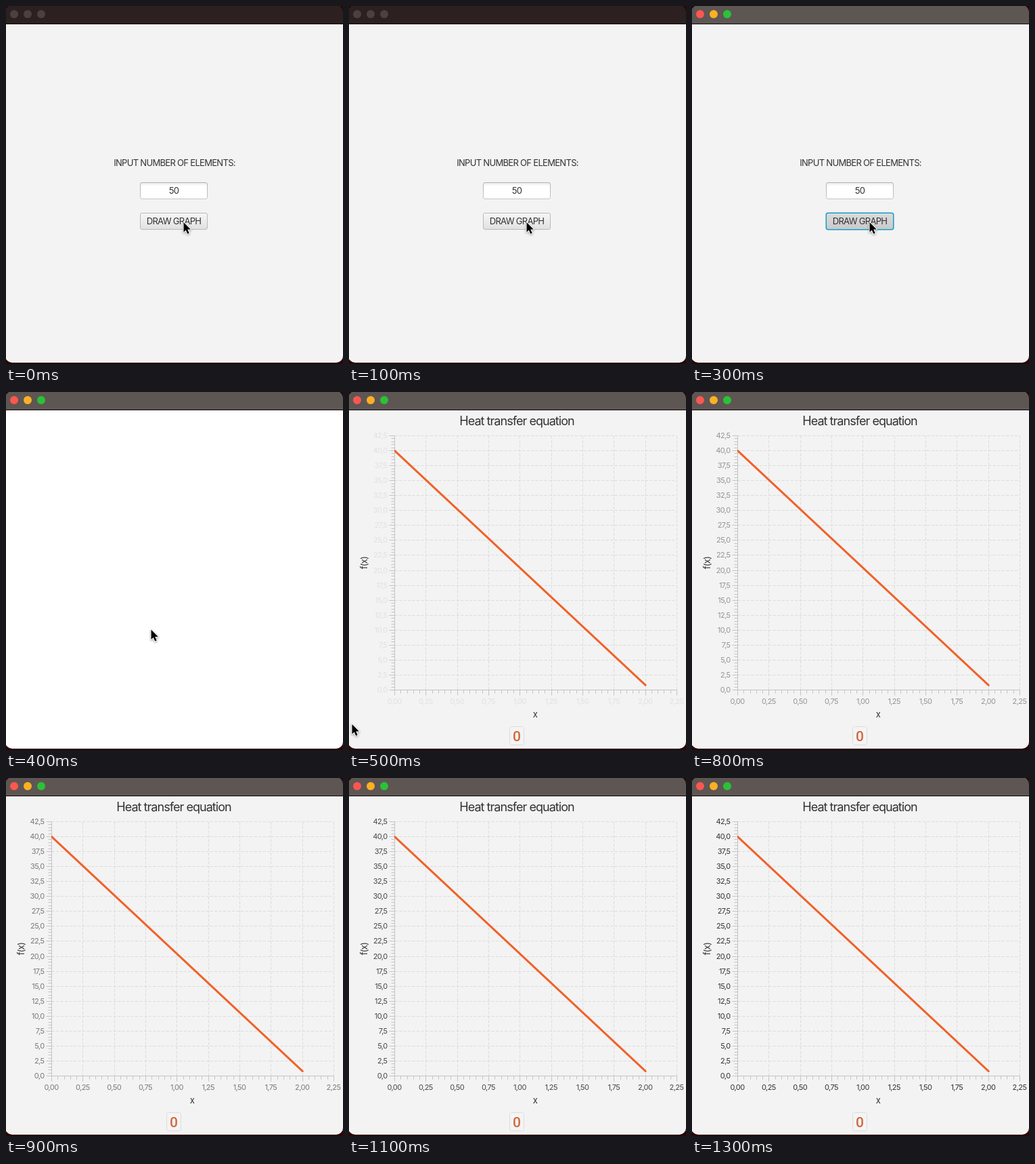
An HTML page with a canvas for the animation above (1.5 s loop, 498 px wide and 528 px high).

```html
<!DOCTYPE html>
<html lang="en">
<head>
<meta charset="utf-8">
<title>Heat transfer equation</title>
<style>
  html, body { margin: 0; width: 100%; height: 100%; overflow: hidden; background: #2a0608; }
  canvas { display: block; }
</style>
</head>
<body>
<canvas id="stage" width="498" height="528"></canvas>
<script>
const ctx = document.getElementById('stage').getContext('2d');
const LOOP = 1500;
const INK = '#323232';
const plot = { left: 67.5, right: 484.5, top: 64.5, bottom: 439.5 };
const toX = v => plot.left + v / 2.25 * (plot.right - plot.left);
const toY = v => plot.bottom - v / 42.5 * (plot.bottom - plot.top);

function text(str, x, y, size = 13, align = 'center', color = INK) {
  ctx.font = `${size}px Inter, sans-serif`;
  ctx.letterSpacing = `${-0.053 * size}px`;
  ctx.textAlign = align;
  ctx.fillStyle = color;
  ctx.fillText(str, x, y);
}

function line(x1, y1, x2, y2) {
  ctx.beginPath();
  ctx.moveTo(x1, y1);
  ctx.lineTo(x2, y2);
  ctx.stroke();
}

function box(x, y, w, h, radius, fill, border, width = 1) {
  ctx.beginPath();
  ctx.roundRect(x, y, w, h, radius);
  ctx.fillStyle = fill;
  ctx.fill();
  ctx.strokeStyle = border;
  ctx.lineWidth = width;
  ctx.stroke();
}

function shade(y1, y2, ...colors) {
  const gradient = ctx.createLinearGradient(0, y1, 0, y2);
  colors.forEach((c, i) => gradient.addColorStop(i / (colors.length - 1), c));
  return gradient;
}

function drawWindow(active, background) {
  ctx.fillStyle = background;
  ctx.fillRect(0, 26, 498, 502);
  ctx.fillStyle = active ? '#5e5653' : '#2c2120';
  ctx.fillRect(0, 0, 498, 26);
  ctx.fillStyle = '#0c0808';
  ctx.fillRect(0, 26, 498, 1);
  const lights = active ? ['#fe5650', '#fdb024', '#2bc138'] : Array(3).fill('#4a4140');
  lights.forEach((color, i) => {
    ctx.beginPath();
    ctx.arc(12 + 20 * i, 12, 6, 0, 2 * Math.PI);
    ctx.fillStyle = color;
    ctx.fill();
  });
}

function drawForm(pressed) {
  text('INPUT NUMBER OF ELEMENTS:', 249, 236);
  box(198.5, 260.5, 99, 24, 2.5, shade(261, 266, '#ececec', '#fff'), shade(260, 285, '#b0b0b0', '#c6c6c6'));
  text('50', 248, 277);
  if (pressed) box(198.25, 305.25, 99.5, 24.5, 3, shade(305, 330, '#dcdcdc', '#c9c9c9'), '#139fc6', 1.5);
  else box(198.5, 305.5, 99, 24, 2.5, shade(305, 330, '#f7f7f7', '#e0e0e0'), '#b9b9b9');
  text('DRAW GRAPH', 248, 322);
}

function drawGrid() {
  ctx.lineWidth = 1;
  ctx.strokeStyle = '#dcdcdc';
  ctx.setLineDash([4.25, 2.25]);
  const snap = v => Math.floor(v) + 0.5;
  for (let i = 1; i <= 9; i++) line(snap(toX(i / 4)), plot.top, snap(toX(i / 4)), plot.bottom);
  for (let i = 1; i <= 17; i++) line(plot.left, snap(toY(i * 2.5)), plot.right, snap(toY(i * 2.5)));
  ctx.setLineDash([]);

  ctx.strokeStyle = '#c4c4c4';
  line(plot.left, plot.top, plot.left, plot.bottom);
  line(plot.left, plot.bottom, plot.right, plot.bottom);
  for (let i = 0; i <= 45; i++) {
    const x = snap(toX(i / 20));
    line(x, plot.bottom, x, plot.bottom + (i % 5 ? 5 : 8));
  }
  for (let i = 0; i <= 85; i++) {
    const y = snap(toY(i / 2));
    line(plot.left - (i % 5 ? 5 : 8), y, plot.left, y);
  }
}

function drawChart(labelAlpha) {
  text('Heat transfer equation', 248, 49, 18);
  drawGrid();

  const comma = (v, digits) => v.toFixed(digits).replace('.', ',');
  ctx.globalAlpha = labelAlpha;
  for (let i = 0; i <= 9; i++) text(comma(i / 4, 2), toX(i / 4) - 0.5, 460, 11);
  for (let i = 0; i <= 17; i++) text(comma(i * 2.5, 1), 56.5, toY(i * 2.5) + 3.5, 11, 'right');
  ctx.globalAlpha = 1;

  text('x', 275, 480);
  ctx.save();
  ctx.translate(27, 252);
  ctx.rotate(-Math.PI / 2);
  text('f(x)', 0, 0);
  ctx.restore();

  ctx.save();
  ctx.beginPath();
  ctx.rect(67, 64, 418, 376);
  ctx.clip();
  ctx.strokeStyle = '#f0622a';
  ctx.lineWidth = 3;
  ctx.lineCap = 'round';
  line(toX(0), toY(40), toX(2), toY(0.8));
  ctx.restore();

  box(237.5, 493.5, 21, 27, 3, '#f4f4f4', '#dddddd');
  ctx.font = '500 21px Roboto, sans-serif';
  ctx.letterSpacing = '0px';
  ctx.textAlign = 'center';
  ctx.fillStyle = '#d0673c';
  ctx.fillText('0', 248, 515);
}

function drawCursor(x, y) {
  ctx.save();
  ctx.translate(x, y);
  const arrow = new Path2D('M0 0V14.5L3.3 11.4L5.7 17L8.2 16L5.8 10.5H10.4Z');
  ctx.lineJoin = 'round';
  ctx.lineWidth = 2;
  ctx.strokeStyle = '#fff';
  ctx.shadowColor = 'rgba(0,0,0,.4)';
  ctx.shadowBlur = 3;
  ctx.shadowOffsetY = 1;
  ctx.stroke(arrow);
  ctx.shadowColor = 'transparent';
  ctx.fillStyle = '#000';
  ctx.fill(arrow);
  ctx.restore();
}

function draw(t) {
  ctx.fillStyle = '#2a0608';
  ctx.fillRect(0, 0, 498, 528);
  ctx.save();
  ctx.beginPath();
  ctx.roundRect(-1, -1, 499, 527, 10);
  ctx.clip();
  drawWindow(t >= 300, t >= 400 && t < 500 ? '#fff' : '#f3f3f3');
  if (t < 400) {
    drawForm(t >= 300);
    drawCursor(262.5, 319);
  } else if (t < 500) {
    drawCursor(214.5, 350.5);
  } else {
    // The screen refreshes every 100 ms while the labels fade in.
    const tick = Math.floor(t / 100) * 100;
    drawChart(Math.min(1, (tick - 430) / 750));
    if (t < 600) drawCursor(4.5, 490);
  }
  ctx.restore();
}

const start = performance.now();
function frame() {
  draw((performance.now() - start) % LOOP);
  requestAnimationFrame(frame);
}
frame();
</script>
</body>
</html>
```
